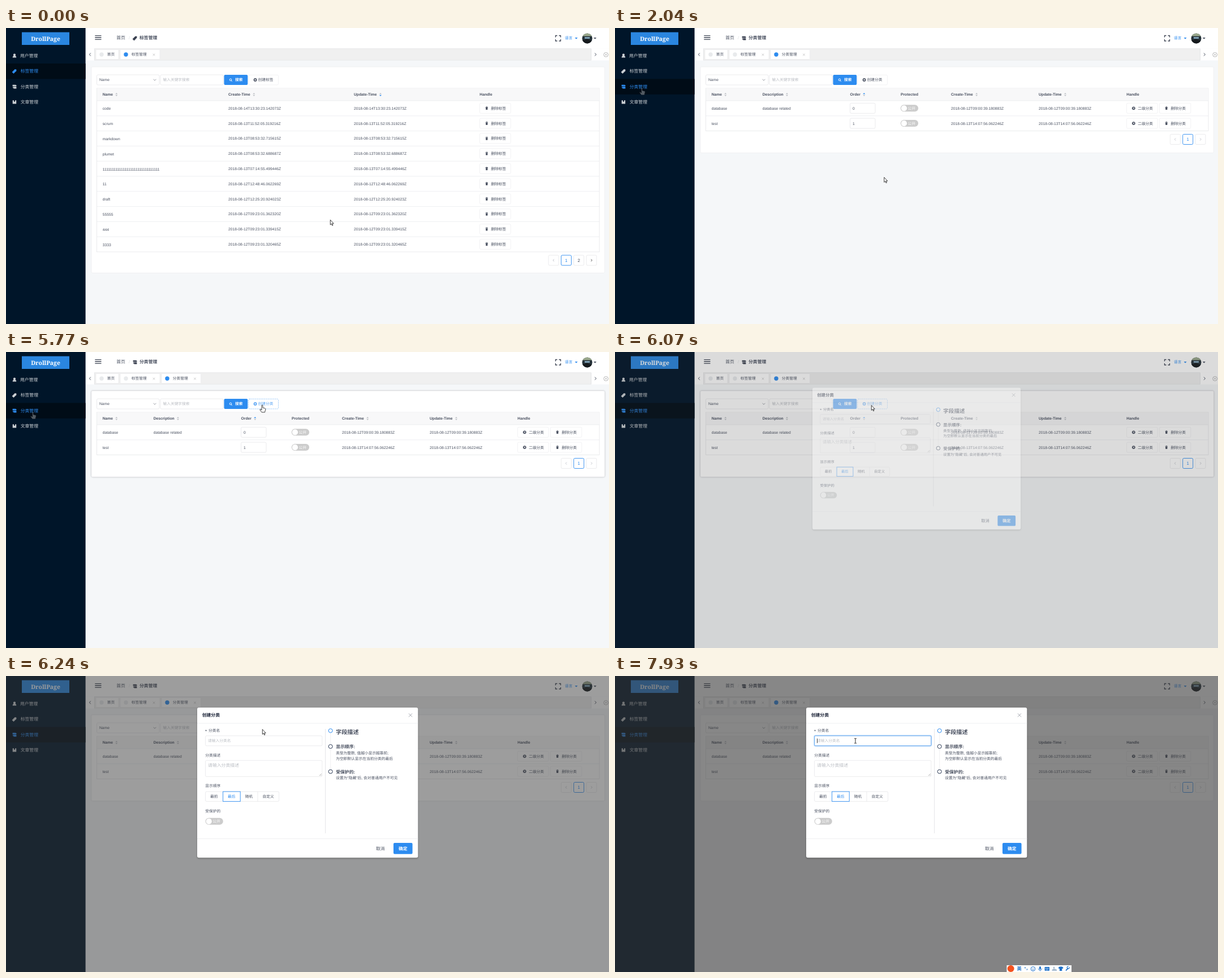
Animation, 1066 px wide and 525 px high, one loop 8 s. Source, as an HTML page:

```html
<!DOCTYPE html>
<html lang="zh">
<head>
<meta charset="utf-8">
<title>标签管理</title>
<style>
html, body { margin: 0; width: 100%; height: 100%; overflow: hidden; background: #f5f7f9; }
svg { display: block; width: 100vw; height: 100vh; }
text { font-family: "Liberation Sans", "Noto Sans CJK SC", "Noto Sans CJK", sans-serif; text-rendering: geometricPrecision; white-space: pre; }
</style>
</head>
<body>
<svg id="stage" viewBox="0 0 1066 525" xmlns="http://www.w3.org/2000/svg"></svg>
<script>
const BLUE = '#2d8cf0', INK = '#495060', LINE = '#dddee1', PALE = '#e9eaec', SMALL = 6.72, MID = 7.85;

// ---- drawing helpers ----
const text = (x, cy, s, o = {}) => {
  const size = o.size || SMALL;
  return `<text x="${x}" y="${cy + size * 0.36}" font-size="${size}" fill="${o.fill || INK}"` +
    `${o.bold ? ' font-weight="700"' : ''}${o.mid ? ' text-anchor="middle"' : ''}${o.font ? ` style="font-family:${o.font}"` : ''}>${s}</text>`;
};
const rect = (x, y, w, h, fill, stroke, r = 0, extra = '') =>
  `<rect x="${x}" y="${y}" width="${w}" height="${h}" rx="${r}" fill="${fill}"${stroke ? ` stroke="${stroke}" stroke-width=".6"` : ''} ${extra}/>`;
const dot = (x, y, r, fill, extra = '') => `<circle cx="${x}" cy="${y}" r="${r}" fill="${fill}" ${extra}/>`;
const stroke = (d, color = INK, w = 0.8, extra = '') =>
  `<path d="${d}" fill="none" stroke="${color}" stroke-width="${w}" ${extra}/>`;
const shape = (d, fill = INK, extra = '') => `<path d="${d}" fill="${fill}" ${extra}/>`;
const group = (id, s, extra = '') => `<g id="${id}" ${extra}>${s}</g>`;
const at = (x, y, s, extra = '') => `<g transform="translate(${x} ${y})" ${extra}>${s}</g>`;
const cross = (x, y, r, color = '#999', w = 0.7) =>
  stroke(`M${x - r} ${y - r}l${2 * r} ${2 * r}M${x + r} ${y - r}l${-2 * r} ${2 * r}`, color, w);
const chevron = (x, y, dir, color = INK, k = 2) =>
  stroke(`M${x - dir * k / 2} ${y - k * 1.3}l${dir * k * 1.2} ${k * 1.3}l${-dir * k * 1.2} ${k * 1.3}`, color, 1);

// ---- icons, centred on 0,0 and filled by their group ----
const icons = {
  user: '<path d="M0-3.6C3-3.6 2 0 1.5.2 3.6 1 3.4 3.2 3 3.4H-3C-3.4 3.2-3.6 1-1.5.2-2 0-3-3.6 0-3.6Z"/>',
  tag: '<path transform="rotate(-45)" d="M-4.2-2H2.6L4.3-.6V.6L2.6 2H-4.2Z"/>',
  sort: '<path d="M-3.4-3.3H2V-.4H-3.4ZM-1.6.3H3.4V3.4H-1.6Z"/><circle cx="2.2" cy="-1.7" r="1.3"/><circle cx="-2.2" cy="1.6" r="1"/>',
  book: '<path d="M-3.3-3.2H-1V-.4L0-1.1 1-.4V-3.2H3.2V3.2H-3.3Z"/>',
  trash: '<path d="M-2.2-2.4H-.9V-3H.9V-2.4H2.2V-1.6H-2.2ZM-1.8-1.2H1.8L1.5 2.8H-1.5Z"/>',
  plus: '<circle r="2.9"/><path d="M-1.6 0H1.6M0-1.6V1.6" stroke="#fff" stroke-width=".9"/>',
  gear: '<circle r="2.9"/><path d="M-1.3-1.3L1.3 1.3M1.3-1.3L-1.3 1.3" stroke="#fff" stroke-width=".9"/>'
};
const icon = (name, x, y, color = INK) => at(x, y, icons[name], color ? `fill="${color}"` : '');

// ---- widgets ----
const sorter = (x, y, on) =>
  shape(`M${x - 2} ${y - 0.7}h4l-2-2.2z`, on === 'up' ? BLUE : '#bbbec4') +
  shape(`M${x - 2} ${y + 0.8}h4l-2 2.2z`, on === 'down' ? BLUE : '#bbbec4');
const button = (x, cy, w, name, label) =>
  rect(x, cy - 9, w, 18, '#fff', PALE, 2) + icon(name, x + 12.3, cy) + text(x + 19.7, cy, label);
const toggle = (x, cy) =>
  rect(x, cy - 6, 31.3, 12, '#ccc', '', 6) + dot(x + 6.2, cy, 5.1, '#fff') + text(x + 13, cy, '公开', { fill: '#fff' });
const field = (x, y, w, h, hint, size) =>
  rect(x, y, w, h, '#fff', LINE, 2) + text(x + 4.5, y + (h > 20 ? 8.2 : h / 2), hint, { fill: '#bbbec4', size });
const pager = (y, pages) => {
  const x0 = 1026 - 22.3 * (pages + 1);
  let s = '';
  for (let i = 0; i < pages + 2; i++) {
    const x = x0 + 22.3 * i, cur = i === 1, last = i === pages + 1;
    s += rect(x, y, 18, 18, '#fff', cur ? BLUE : LINE, 2, cur ? 'style="stroke-width:.9"' : '');
    if (i === 0 || last) s += chevron(x + 9, y + 9, last ? 1 : -1, last && pages > 1 ? '#666' : '#c5c8ce', 1.6);
    else s += text(x + 9, y + 9, i, { size: MID, mid: 1, fill: cur ? BLUE : INK });
  }
  return s;
};
const panel = (h, shadow) =>
  rect(151, 69, 907.3, h, '#000', '', 2, `id="${shadow}" style="filter:url(#blur)"`) + rect(151, 69, 907.3, h, '#fff', PALE, 2);
const grid = (rows, cols) => {
  const h = 22 + 26.8 * rows;
  let s = rect(160.5, 107, 888.5, h, '#fff', LINE) + rect(160.8, 107.3, 888, 21.7, '#f8f8f9');
  for (let i = 0; i < rows; i++) s += stroke(`M160.5 ${129 + 26.8 * i}H1049`, '#e3e5e8', 0.6);
  for (const [x, label, sx, on] of cols)
    s += text(x, 118, label, { bold: 1 }) + (sx ? sorter(sx, 118, on) : '');
  return s;
};
const rowY = i => 142.3 + 26.8 * i;

// ---- pages ----
const tools = (noun, id) =>
  field(160.5, 83, 110.5, 18, '') + text(165, 92, 'Name') + stroke('M260.6 90.8l2.4 2.4 2.4-2.4', '#80848f', 0.8) +
  field(273, 83, 111, 18, '输入关键字搜索') +
  rect(385.5, 83, 41.8, 18, BLUE, '', 2) + stroke('M398 93l1.7 1.8', '#fff', 1) +
  dot(397, 91.8, 1.8, 'none', 'stroke="#fff" stroke-width=".9"') + text(405, 92, '搜索', { fill: '#fff', bold: 1 }) +
  rect(428.7, 83.3, 52.8, 17.6, '#fff', PALE, 2, `id="${id}Box"`) +
  `<g id="${id}" fill="${INK}">` + icon('plus', 440.6, 92, '') + text(445.6, 92, '创建' + noun, { fill: 'inherit' }).replace('fill="inherit"', '') + '</g>';

const tags = [
  ['code', '14T13:30:23.142073'], ['scrum', '13T11:52:05.319216'], ['markdown', '13T08:53:32.715615'],
  ['plumet', '13T08:53:32.688687'], ['1'.repeat(31), '13T07:14:55.499446'], ['11', '12T12:48:46.062269'],
  ['draft', '12T12:25:20.924023'], ['55555', '12T09:23:01.362320'], ['444', '12T09:23:01.339415'], ['3333', '12T09:23:01.320465']
];
const stamp = s => `2018-08-${s}Z`;
const tagPage = () => panel(365.5, 'tagShade') + tools('标签', 'newTag') +
  grid(10, [[170.7, 'Name', 195.3], [393, 'Create-Time', 438.3], [615, 'Update-Time', 662, 'down'], [837.3, 'Handle']]) +
  tags.map(([n, d], i) => text(170.7, rowY(i) + 0.6, n) + text(393, rowY(i), stamp(d)) + text(615, rowY(i), stamp(d)) +
    button(837.5, rowY(i), 54.7, 'trash', '删除标签')).join('') + pager(403, 2);

const kinds = [['database', 'database related', '12T09:00:39.180883'], ['test', '', '13T14:07:56.062246']];
const kindCols = [[170.7, 'Name', 195.3], [260.7, 'Description', 304], [415.6, 'Order', 440.3, 'up'], [505, 'Protected'],
  [594, 'Create-Time', 639.2], [749, 'Update-Time', 796], [904.3, 'Handle']];
const emptyPage = () => panel(125.5, 'emptyShade') + tools('分类', 'newEmpty') + grid(1, kindCols) +
  text(605, 142.3, '暂无数据', { mid: 1 }) + pager(161.8, 1);
const kindPage = () => panel(152.5, 'kindShade') + tools('分类', 'newKind') + grid(2, kindCols) +
  kinds.map(([n, d, s], i) => {
    const y = rowY(i);
    return text(170.7, y + 0.6, n) + text(260.7, y + 0.6, d) + rect(415.6, y - 9, 44.4, 18, '#fff', LINE, 2) + text(420, y + 0.4, i) +
      toggle(504.8, y) + text(594, y, stamp(s)) + text(749, y, stamp(s)) +
      button(904.5, y, 54.7, 'gear', '二级分类') + button(962.5, y, 55.3, 'trash', '删除分类');
  }).join('') + pager(188.5, 1);

// ---- frame around the pages ----
const menu = [['user', '用户管理'], ['tag', '标签管理'], ['sort', '分类管理'], ['book', '文章管理']];
const sidebar = () => rect(0, 0, 140.6, 525, '#001529') + rect(0, 63, 140.6, 27.4, '#000c17', '', 0, 'id="active"') +
  rect(28, 7.5, 84, 22.5, '#2a86e0') +
  text(70, 18.8, 'DrollPage', { size: 10.4, fill: '#fff', bold: 1, mid: 1, font: "'Noto Serif',serif" }) +
  menu.map(([ic, label], i) => {
    const y = 49.2 + 27.4 * i;
    return group('menu' + i, icon(ic, 15, y, '') + text(25 + (i ? 0.7 : 0), y - 0.3, label, { size: MID }).replace(`fill="${INK}"`, ''));
  }).join('');

const crumb = (id, ic, label) => group(id, icon(ic, 228, 18, '#3a4050') + text(236, 17.6, label, { size: MID, bold: 1 }));
const header = () => rect(140.6, 0, 926, 36.3, '#fff') +
  stroke('M157.3 13.6h11.2M157.3 17h11.2M157.3 20.4h11.2', '#3f4655', 1.3) +
  text(195.2, 17.6, '首页', { size: MID }) + text(217, 17.6, '/', { size: MID, fill: '#dddee1' }) +
  crumb('crumbTag', 'tag', '标签管理') + crumb('crumbKind', 'sort', '分类管理') +
  stroke('M971.5 16.5v-3h3M977.5 13.5h3v3M980.5 20v3h-3M974.5 23h-3v-3', '#3f4655', 1.3) +
  text(988, 17.6, '语言', { fill: BLUE }) + shape('M1005.6 17h5l-2.5 2.8z', BLUE) + shape('M1038.8 17h5l-2.5 2.8z') +
  `<g clip-path="url(#face)">` + rect(1018, 9, 19, 19, '#26323a') + rect(1018, 9, 19, 5.5, '#9aa88c') +
  shape('M1018 28v-6l9-2 10 3v5z', '#15191c') + rect(1023, 16, 9, 3, '#7ea0b4') + '</g>';

const tab = (x, w, label, id, closable) => rect(x, 38.4, w, 17.2, '#fff', '#e9eaec', 1) + dot(x + 10, 47, 3.7, '#e8eaec') +
  dot(x + 10, 47, 3.7, BLUE, `id="${id}"`) + text(x + 19.8, 47, label) + (closable ? cross(x + w - 10.5, 47.4, 1.8, '#aaa', 0.6) : '');
const tabs = () => rect(140.6, 36.3, 926, 21.2, '#fff') + rect(156.5, 36.8, 878, 20.3, '#f0f0f0', '#d9dbde') +
  chevron(148.8, 47, -1) + chevron(1042, 47, 1) + dot(1060.6, 47.3, 3.9, 'none', 'stroke="#888" stroke-width=".6"') + cross(1060.6, 47.3, 1.5, '#888', 0.6) +
  tab(159, 40, '首页', 'dotHome') + tab(202, 70, '标签管理', 'dotTag', 1) + group('tabKind', tab(275, 69.5, '分类管理', 'dotKind', 1));

// ---- dialog ----
const ring = (y, color) => dot(573.7, y, 3.5, '#fff', `stroke="${color}" stroke-width="1"`);
const dialog = () => {
  const options = [[361, '最前'], [392, '最后'], [422.7, '随机'], [453.5, '自定义']];
  return rect(338, 58, 390.3, 266, '#000', '', 3, 'opacity=".25" style="filter:url(#blur)"') + rect(338, 56, 390.3, 266.3, '#fff', '', 3) +
    text(346.7, 69.5, '创建分类', { size: MID, bold: 1, fill: '#1c2438' }) + cross(715, 69.5, 3, '#8a8f99', 0.8) +
    stroke('M338 83.9H728.3M338 288.6H728.3', PALE, 0.7) + stroke('M564.6 94V279', LINE, 0.8) +
    text(352.3, 97.6, '*', { bold: 1 }) + text(358, 96.8, '分类名') +
    field(352.6, 106, 206.3, 17.8, '请输入分类名') +
    group('focus', rect(352, 105.4, 207.5, 19, 'none', '', 2.4, 'stroke="#2d8cf0" stroke-opacity=".25" stroke-width="1.6"') +
      rect(352.6, 106, 206.3, 17.8, 'none', '', 2, 'stroke="#57a3f3" stroke-width=".9"')) +
    rect(357.1, 110.8, 0.8, 8.2, '#222', '', 0, 'id="caret"') +
    text(352.3, 140.6, '分类描述') + field(352.6, 149.8, 206.3, 28.6, '请输入分类描述', MID) +
    stroke('M554 177l3.8-3.8M556.4 177l1.4-1.4', '#888', 0.6) +
    text(352.3, 195, '显示顺序') + rect(352.6, 205, 130, 17.4, '#fff', LINE, 2) + stroke('M445 205v17.4', LINE, 0.6) +
    rect(383.6, 205, 30.6, 17.4, '#fff', BLUE, 0, 'style="stroke-width:.9"') +
    options.map(([x, s], i) => text(x, 213.6, s, { fill: i === 1 ? BLUE : INK })).join('') +
    text(352.3, 239.2, '受保护的') + toggle(352.5, 257.8) +
    stroke('M573.7 101V121M573.7 129V165', PALE, 0.7) + ring(97, BLUE) + ring(125, '#2b3a55') + ring(169.5, '#2b3a55') +
    text(583.2, 99.3, '字段描述', { size: 10.1, bold: 1 }) + text(583.2, 125.5, '显示顺序:', { size: MID, bold: 1 }) +
    text(583.2, 136.4, '类型为整数, 值越小显示越靠前;') + text(583.2, 146.5, '为空即默认显示在当前分类的最后') +
    text(583.2, 170.2, '受保护的:', { size: MID, bold: 1 }) + text(583.2, 181, '设置为"隐藏"后, 会对普通用户不可见') +
    text(654, 305.8, '取消', { size: MID }) + rect(685, 296, 33.6, 19.7, BLUE, '', 2) + text(694, 305.8, '确定', { size: MID, fill: '#fff', bold: 1 });
};

// ---- input method strip ----
const strip = () => {
  const c = '#1b6fc8';
  return rect(692.5, 513, 114.5, 12, '#fff') + dot(699.7, 519, 6, '#f4511e') + text(710.5, 519.3, '英', { size: 8.4, bold: 1, fill: c }) +
    dot(725, 517.5, 1, c) + stroke('M728.5 519.3q.6 1.2-.6 2.4', c, 1.1) +
    dot(739, 519.4, 3.9, 'none', `stroke="${c}" stroke-width=".9"`) + dot(737.6, 518.3, 0.6, c) + dot(740.4, 518.3, 0.6, c) + stroke('M737 520.3q2 2.2 4 0', c, 0.8) +
    rect(750, 515, 3, 5.4, c, '', 1.5) + stroke('M748.3 518.6q.2 3.4 3.2 3.4t3.2-3.4M751.5 522v1.5', c, 0.8) +
    rect(759.6, 516, 8.4, 6.8, c, '', 0.8) + stroke('M760.8 518h6M760.8 519.6h6M762 521.3h3.6', '#fff', 0.7, 'stroke-dasharray="1.1 .5"') +
    dot(776, 517, 1.5, '#a9bdd0') + shape('M772.6 523v-2.2l3.4-2.2 5 2.2v2.2z', '#a9bdd0') +
    shape('M786 515.6h4.4l2.2 2-1.3 1.7-1-.6v4.4h-4.4v-4.4l-1 .6-1.3-1.7z', c) +
    stroke('M797 522.3l4-4', c, 1.8) + stroke('M803 516.4a2 2 0 1 1-1.4-1.2', c, 1.2);
};

const hand = shape('M-1 .9Q-1-.2 0-.2T1 .9V4.6L4.6 5.5Q6 5.9 5.8 7.3L5.1 10.4 4.5 12.6H-.9L-4 8.5Q-4.3 7.2-3 7.2L-1 8.6Z', '#fff', 'stroke="#111" stroke-width=".8"');
const arrow = shape('M.3.3V9.1L2.3 7.3 3.7 10.4 5 9.8 3.6 6.8H6.3Z', '#fff', 'stroke="#111" stroke-width=".8"');
const beam = stroke('M-2-4.2H-.5L0-3.8.5-4.2H2M0-3.8V3.8M-2 4.2H-.5L0 3.8.5 4.2H2', '#111', 0.9);

document.getElementById('stage').innerHTML =
  '<defs><filter id="blur" x="-5%" y="-10%" width="110%" height="120%"><feGaussianBlur stdDeviation="1.8"/></filter>' +
  '<clipPath id="face"><circle cx="1027.5" cy="18.4" r="9"/></clipPath></defs>' +
  rect(0, 0, 1066, 525, '#f5f7f9') + group('tagPage', tagPage()) + group('emptyPage', emptyPage()) + group('kindPage', kindPage()) +
  header() + tabs() + sidebar() + at(47.5, 106.3, hand, 'id="trace" opacity=".32"') +
  rect(0, 0, 0, 1.2, BLUE, '', 0, 'id="bar"') + rect(0, 0, 1066, 525, '#373737', '', 0, 'id="mask"') +
  group('dialog', dialog()) + group('strip', strip()) +
  group('pointer', group('arrow', arrow) + group('hand', hand) + group('beam', beam));

// ---- timeline ----
const $ = {};
document.querySelectorAll('[id]').forEach(e => { $[e.id] = e; });
const ramp = (t, a, b) => Math.min(1, Math.max(0, (t - a) / (b - a)));
const show = (id, on) => { $[id].style.display = on ? '' : 'none'; };
const set = (id, name, v) => $[id].setAttribute(name, v);

const path = [[70, 573, 340], [700, 47.5, 106.3], [1750, 47.5, 106.3], [2030, 475.5, 264.5], [2500, 475.5, 264.5], [2740, 442, 222],
  [2850, 442, 222], [3300, 165, 205], [3670, 172, 179], [3740, 172, 179], [4060, 800, 150], [4370, 453.5, 99], [4560, 453.5, 99],
  [4680, 453.5, 98], [5200, 453.5, 98], [5370, 453, 94.3], [6420, 453, 94.3], [6720, 425, 115]];
const locate = t => {
  let i = 0;
  while (i < path.length - 2 && t > path[i + 1][0]) i++;
  const [a, x, y] = path[i], [b, u, v] = path[i + 1], k = ramp(t, a, b), e = k * k * (3 - 2 * k);
  return [x + (u - x) * e, y + (v - y) * e];
};
const fadeSteps = [6000, 6070, 6150, 6240, 6300];

function draw(t) {
  const moved = t >= 1130, loaded = t >= 1400, chosen = t >= 870;
  show('tagPage', !moved); show('emptyPage', moved && !loaded); show('kindPage', loaded);
  show('crumbTag', !moved); show('crumbKind', moved); show('tabKind', moved); show('dotHome', false);
  set('dotTag', 'opacity', moved ? 0.45 * (1 - ramp(t, 1200, 1290)) : 1);
  set('active', 'y', moved ? 90.4 : 63);
  const pick = chosen ? 2 : 1;
  for (let i = 0; i < 4; i++)
    set('menu' + i, 'fill', i === pick ? BLUE : i === 2 && t > 680 ? '#fff' : '#ccd0d4');

  set('tagShade', 'opacity', 0.22 * (ramp(t, 70, 270) - ramp(t, 500, 700)));
  set('emptyShade', 'opacity', 0);
  set('kindShade', 'opacity', 0.3 * (ramp(t, 2890, 3090) - ramp(t, 6100, 6300)));

  set('bar', 'width', moved ? 350 + 716 * ramp(t, 1200, 1290) : 0);
  set('bar', 'opacity', 1 - ramp(t, 1880, 2035));

  const hover = t >= 4600;
  set('newKindBox', 'stroke', hover ? '#57a3f3' : PALE);
  set('newKindBox', 'stroke-dasharray', hover ? '2 1.2' : 'none');
  set('newKind', 'fill', hover ? '#57a3f3' : INK);

  const step = fadeSteps.filter(s => s <= t).pop() || 0;
  const zoom = ramp(step, 5970, 6200), k = 0.9 + 0.1 * zoom;
  set('mask', 'opacity', 0.6 * ramp(step, 5970, 6300));
  show('dialog', zoom > 0);
  set('dialog', 'opacity', zoom);
  set('dialog', 'transform', `translate(${533 * (1 - k)} ${189 * (1 - k)}) scale(${k})`);
  show('focus', t >= 6850);
  show('caret', t >= 6850 && (t < 7380 || t >= 7930));
  show('strip', t >= 7000);

  const [x, y] = locate(t);
  const overLink = (t >= 690 && t < 1780) || (t >= 4330 && t < 6000), overText = t > 6420 && y > 106;
  show('hand', overLink); show('beam', overText); show('arrow', !overLink && !overText);
  set('pointer', 'transform', `translate(${x} ${y})`);
  show('trace', t >= 1780 && t < 6000);
}

const start = performance.now();
function tick() {
  draw((performance.now() - start) % 8000);
  requestAnimationFrame(tick);
}
tick();
</script>
</body>
</html>
```
